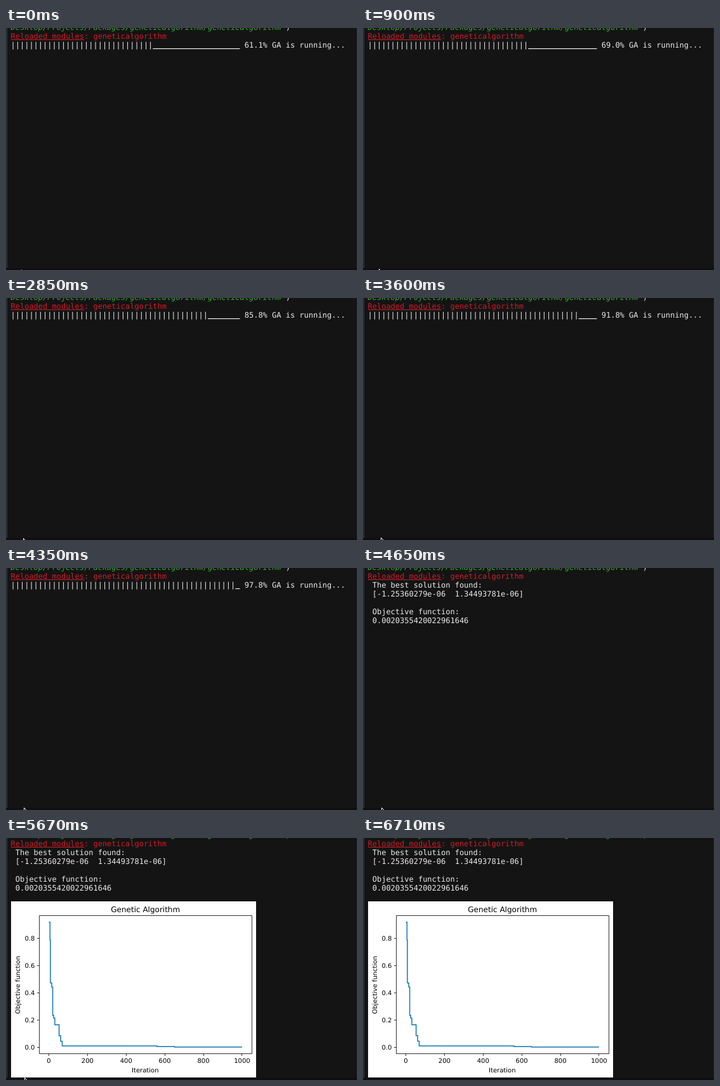
An HTML page with a canvas for the animation above (7610 ms loop, 553 by 382 pixels).

```html
<!DOCTYPE html>
<html lang="en">
<head>
<meta charset="utf-8">
<title>Genetic algorithm run</title>
<style>
html, body { margin: 0; width: 553px; height: 382px; overflow: hidden; background: #141414; }
canvas { display: block; }
</style>
</head>
<body>
<canvas id="stage" width="553" height="382"></canvas>
<script>
const ctx = document.getElementById('stage').getContext('2d');
const LOOP = 7610, STEP = 150, SOLVED = 4650, PLOTTED = 4790, POINTER_END = 6710;
const LEFT = 7.5, CHAR = 7.22, LINE = 14, BAR = 50;
const MONO = '12px "DejaVu Sans Mono", monospace';
const SANS = '"DejaVu Sans", sans-serif';
const WHITE = '#eaeaea', RED = '#d01c26', GREEN = '#38ac32';

// [time, percent]
const progress = [[0, 61.1], [1650, 75.6], [2850, 85.8], [3600, 91.8], [4500, 99]];
// [iteration, best value so far]
const best = [[0, 0.92], [6, 0.79], [8, 0.473], [15, 0.443], [20, 0.234], [25, 0.215], [31, 0.165],
  [53, 0.085], [61, 0.045], [69, 0.009], [560, 0.005], [650, 0.001], [1000, 0.001]];

function percent(t) {
  const i = Math.max(1, progress.findIndex(k => k[0] >= t));
  const [t0, p0] = progress[i - 1], [t1, p1] = progress[i];
  return p0 + (p1 - p0) * (t - t0) / (t1 - t0);
}

function rect(x, y, w, h, color) {
  ctx.fillStyle = color;
  ctx.fillRect(x, y, w, h);
}

function mono(text, col, y, color, style = '') {
  ctx.font = style + MONO;
  ctx.textAlign = 'left';
  ctx.fillStyle = color;
  [...text].forEach((c, i) => ctx.fillText(c, LEFT + (col + i) * CHAR, y));
}

function label(text, x, y, align = 'center', size = 10) {
  ctx.font = size + 'px ' + SANS;
  ctx.textAlign = align;
  ctx.fillText(text, x, y);
}

function drawHeader(y) {
  mono('Desktop/Projects/Packages/geneticalgorithm/geneticalgorithm\'', 0, y - LINE, GREEN, 'italic ');
  mono(')', 60, y - LINE, WHITE);
  mono('Reloaded modules: geneticalgorithm', 0, y, RED);
  rect(LEFT + 0.5, y + 1, 16 * CHAR, 1, RED);
}

function drawProgress(t, y) {
  const p = percent(t), done = Math.round(p / 100 * BAR);
  mono('|'.repeat(done), 0, y, WHITE);
  rect(LEFT + done * CHAR, y + 1, (BAR - done) * CHAR, 1.2, WHITE);
  mono(p.toFixed(1) + '% GA is running...', BAR + 1, y, WHITE);
}

function drawSolution(y) {
  ['The best solution found:', '[-1.25360279e-06  1.34493781e-06]', '',
    'Objective function:', '0.0020355420022961646']
    .forEach((s, i) => mono(s, 1, y + i * LINE, WHITE));
}

function drawPlot() {
  const px = n => 67.5 + n * 0.3044, py = v => 330.3 - v * 214.7;
  const snap = v => Math.floor(v) + 0.5;
  rect(8, 100, 386, 278, '#fff');

  ctx.beginPath();
  best.forEach(([n, v], i) => {
    if (i) ctx.lineTo(px(n), py(best[i - 1][1]));
    ctx.lineTo(px(n), py(v));
  });
  ctx.strokeStyle = '#1277b4';
  ctx.lineWidth = 1.5;
  ctx.stroke();

  ctx.fillStyle = '#000';
  ctx.beginPath();
  ctx.rect(52.5, 122.5, 335, 218);
  for (let n = 0; n <= 1000; n += 200) {
    ctx.moveTo(snap(px(n)), 340.5);
    ctx.lineTo(snap(px(n)), 344);
    label(n, px(n), 355);
  }
  for (let i = 0; i < 5; i++) {
    const y = py(i / 5);
    ctx.moveTo(49, snap(y));
    ctx.lineTo(52.5, snap(y));
    label((i / 5).toFixed(1), 45.3, y + 3.9, 'right');
  }
  ctx.strokeStyle = '#000';
  ctx.lineWidth = 0.8;
  ctx.stroke();

  label('Genetic Algorithm', 219.7, 116.7, 'center', 12);
  label('Iteration', 219.3, 370);
  ctx.save();
  ctx.translate(22, 232);
  ctx.rotate(-Math.PI / 2);
  label('Objective function', 0, 0);
  ctx.restore();
}

// Mouse arrow creeping in from below, mostly cut off by the stage edge
function drawPointer(t) {
  const x = Math.round(24 + Math.min(5, t / 1000)) + 0.5;
  const y = Math.round(381 - Math.min(3, t / 1200)) + 0.5;
  ctx.beginPath();
  ctx.moveTo(x, y);
  ctx.lineTo(x, y + 14);
  ctx.lineTo(x + 10, y + 10);
  ctx.closePath();
  ctx.fillStyle = '#000';
  ctx.fill();
  ctx.strokeStyle = '#fff';
  ctx.lineWidth = 1;
  ctx.stroke();
}

function draw(t) {
  const tick = Math.floor(t / STEP) * STEP;
  const plotted = t >= PLOTTED, y = plotted ? 13 : 17;
  rect(0, 0, 553, 382, '#141414');
  drawHeader(y);
  if (t < SOLVED) drawProgress(tick, y + LINE);
  else drawSolution(y + LINE);
  if (plotted) drawPlot();
  rect(0, 0, 1, 382, '#1a1e22');
  rect(1, 0, 1, 379, '#2e3e4a');
  rect(552, 0, 1, 382, '#1a1e22');
  rect(0, 379, 553, 3, '#110d10');
  if (t < POINTER_END) drawPointer(tick);
}

ctx.textRendering = 'geometricPrecision';
const start = performance.now();
function frame() {
  draw((performance.now() - start) % LOOP);
  requestAnimationFrame(frame);
}
frame();
</script>
</body>
</html>
```
